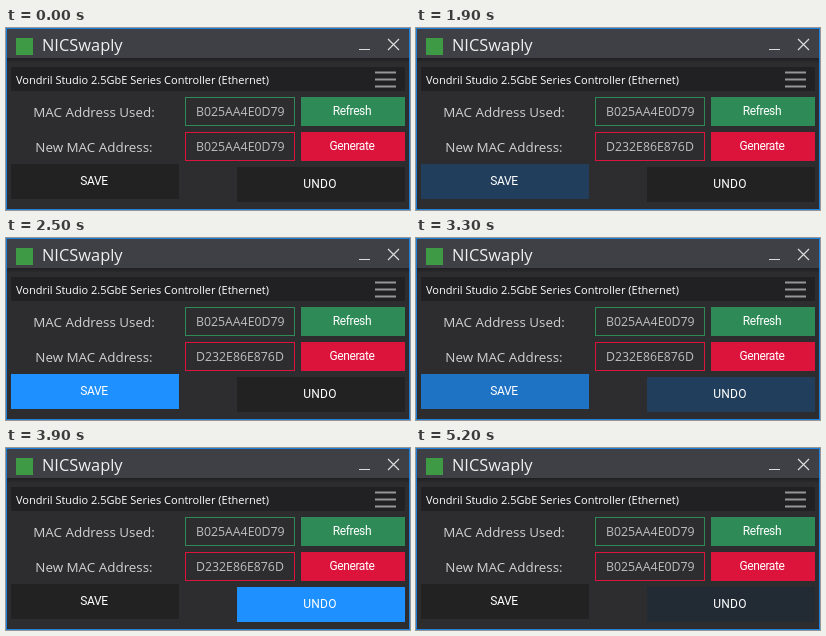
An HTML page for the animation above (5.62 s loop, 404 px wide and 182 px high).

```html
<!DOCTYPE html>
<html lang="en">
<head>
<meta charset="utf-8">
<title>Adapter address tool</title>
<style>
  html, body { margin: 0; width: 100%; height: 100%; overflow: hidden; background: #2d2d30; }
  svg { display: block; width: 404px; height: 182px; }
  text { font-family: "Open Sans", "Noto Sans", sans-serif; fill: #d0d0d0; }
  .title { font-size: 16.4px; fill: #f0f0f0; }
  .adapter { font-size: 11px; fill: #fff; }
  .label { font-size: 13.4px; text-anchor: middle; }
  .mac { font-size: 12.3px; fill: #bebebe; }
  .button { font: 12px Roboto, "Liberation Sans", sans-serif; fill: #fff; text-anchor: middle; letter-spacing: -.4px; }
  .line { fill: none; stroke: #dcdcdc; }
</style>
</head>
<body>
<svg viewBox="0 0 404 182">
  <defs>
    <linearGradient id="shade" x2="0" y2="1">
      <stop stop-opacity=".3"/>
      <stop offset="1" stop-opacity="0"/>
    </linearGradient>
  </defs>
  <rect width="404" height="182" fill="#2d2d30"/>
  <rect width="404" height="30" fill="#3f3f46"/>
  <rect y="30" width="404" height="5" fill="url(#shade)"/>
  <rect x=".5" y=".5" width="403" height="181" fill="none" stroke="#1e80dc"/>

  <rect x="10" y="10" width="17" height="17" fill="#3f9a45"/>
  <text class="title" x="36" y="23">NICSwaply</text>
  <path class="line" d="M353 21.5h11"/>
  <path class="line" d="M382 11l11 11M393 11l-11 11" stroke-width="1.2"/>

  <rect x="5" y="39" width="394" height="24" fill="#212123"/>
  <text class="adapter" x="10" y="56">Vondril Studio 2.5GbE Series Controller (Ethernet)</text>
  <path d="M369 44.5h21M369 51.5h21M369 58.5h21" stroke="#969696" stroke-width="2"/>

  <text class="label" x="88" y="89">MAC Address Used:</text>
  <text class="label" x="88" y="124">New MAC Address:</text>

  <rect x="179.5" y="69.5" width="109" height="28" fill="#2d2d30" stroke="#2e8b57"/>
  <rect x="179.5" y="104.5" width="109" height="28" fill="#2d2d30" stroke="#dc143c"/>
  <text class="mac" x="190" y="88">B025AA4E0D79</text>
  <text class="mac" id="oldMac" x="190" y="123">B025AA4E0D79</text>
  <text class="mac" id="newMac" x="190" y="123">D232E86E876D</text>

  <rect x="295" y="69" width="104" height="29" fill="#2e8b57"/>
  <rect x="295" y="104" width="104" height="29" fill="#dc143c"/>
  <text class="button" x="346" y="87">Refresh</text>
  <text class="button" x="346" y="122">Generate</text>

  <rect id="save" x="5" y="136" width="168" height="35"/>
  <rect id="undo" x="231" y="139" width="168" height="35"/>
  <text class="button" x="88" y="157">SAVE</text>
  <text class="button" x="314" y="160" style="letter-spacing: .3px">UNDO</text>
</svg>
<script>
  const LOOP = 5620, STEP = 100, TOTAL = 7;
  // Steps reached every 100 ms; the last one holds.
  const CUT = [1, 2, 3, 4, 5];
  const FULL = [...CUT, TOTAL];
  const LATE = [...CUT, 5, TOTAL];
  const IDLE = [34, 34, 34], ACTIVE = [30, 144, 255];
  const [oldMac, newMac, save, undo] =
    ["oldMac", "newMac", "save", "undo"].map(id => document.getElementById(id));

  // Stepped ease-out fade beginning at `start`.
  function fade(time, start, steps) {
    if (time < start) return 0;
    const i = Math.min(Math.floor((time - start) / STEP), steps.length - 1);
    return 1 - (1 - steps[i] / TOTAL) ** 2;
  }

  function tint(rect, amount) {
    const rgb = IDLE.map((c, i) => Math.round(c + (ACTIVE[i] - c) * amount));
    rect.setAttribute("fill", `rgb(${rgb})`);
  }

  function draw(now) {
    const time = now % LOOP;
    const mac = fade(time, 500, FULL) * (1 - fade(time, 4700, FULL));
    const swap = fade(time, 3300, LATE);

    oldMac.setAttribute("opacity", 1 - mac);
    newMac.setAttribute("opacity", mac);
    tint(save, fade(time, 1900, LATE) * (1 - swap));
    tint(undo, swap * (1 - fade(time, 4700, CUT)));
  }

  const origin = performance.now();
  function tick() {
    draw(performance.now() - origin);
    requestAnimationFrame(tick);
  }
  tick();
</script>
</body>
</html>
```
